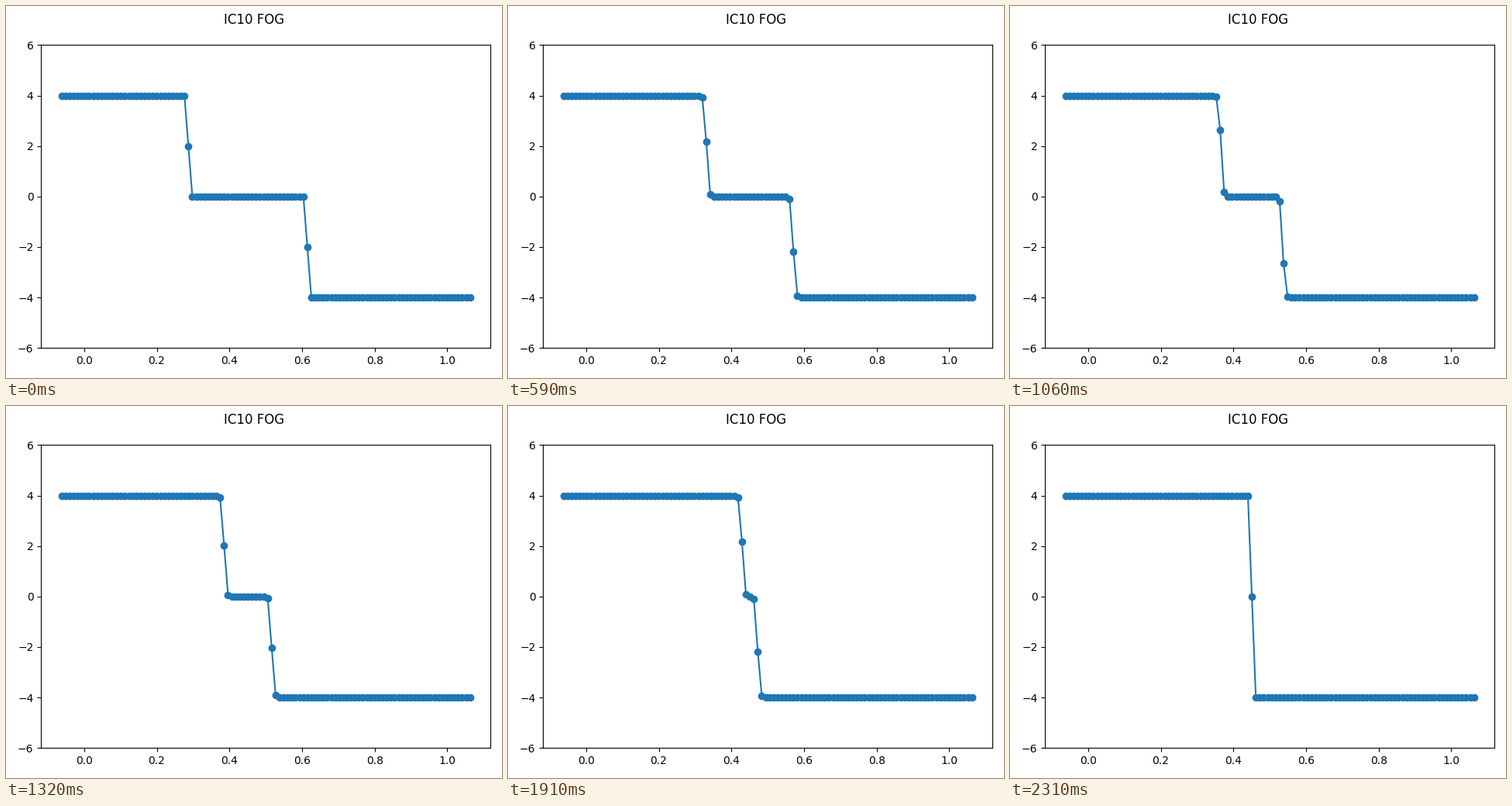
A matplotlib script that plays this animation: 640 by 480 pixels, repeating every 8780 ms.

```python
import matplotlib.pyplot as plt
import numpy as np
from matplotlib.animation import FuncAnimation

CELLS = 104
CFL, U_MAX = 0.9, 4.0
FRAMES, LOOP_MS = 134, 8780


def godunov_flux(left, right):
    """Exact Riemann flux for the inviscid Burgers equation."""
    return np.maximum(np.maximum(left, 0) ** 2, np.minimum(right, 0) ** 2) / 2


def advance(u):
    flux = godunov_flux(u[:-1], u[1:])
    new = u.copy()
    new[1:-1] -= CFL / U_MAX * np.diff(flux)
    return new


index = np.arange(CELLS)
x = np.linspace(-1 / 16, 17 / 16, CELLS)

# Two steps that travel towards each other, each with a half-filled cell.
initial = -U_MAX / 2 * (np.sign(index - 32) + np.sign(index - 62))
states = [initial]
for _ in range(FRAMES - 1):
    states.append(advance(states[-1]))

fig, ax = plt.subplots(figsize=(6.4, 4.8), dpi=100)
fig.suptitle("IC10 FOG", y=0.982)
line, = ax.plot(x, initial, "o-")
ax.set_ylim(-6, 6)
fig.tight_layout()
fig.subplots_adjust(top=0.895)


def update(frame):
    line.set_ydata(states[frame])
    return line,


anim = FuncAnimation(fig, update, frames=FRAMES, interval=LOOP_MS / FRAMES,
                     repeat=True, repeat_delay=0)
plt.show()
```
